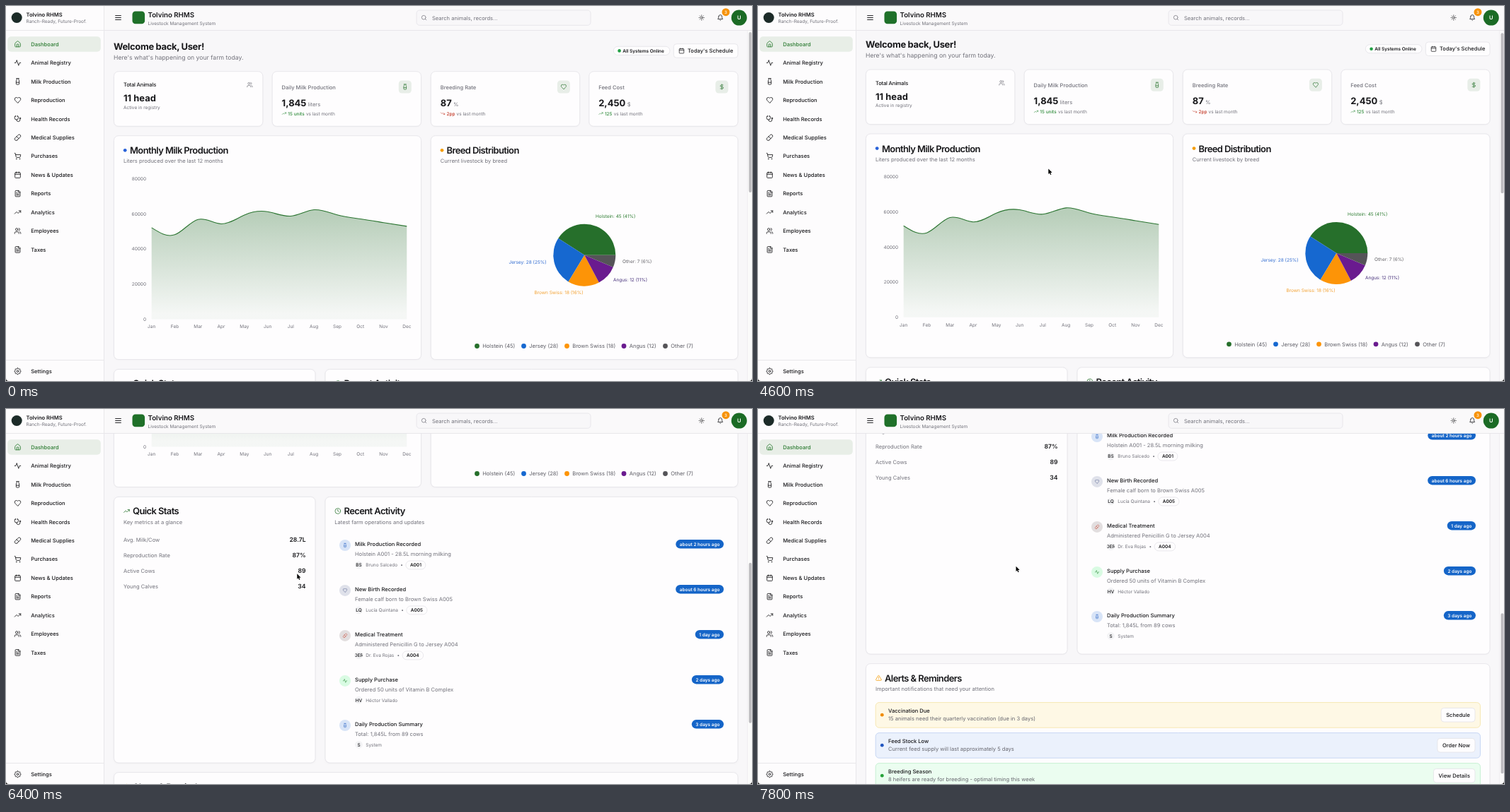
Write an HTML page with a canvas that moves like this. It is 1054 px wide and 531 px high and loops after 8000 ms.

```html
<!DOCTYPE html>
<html lang="en">
<head>
<meta charset="utf-8">
<title>Farm dashboard</title>
<style>
  html, body { margin: 0; width: 100%; height: 100%; overflow: hidden; background: #f8f7f9; }
  canvas { display: block; width: 100vw; height: 100vh; }
</style>
</head>
<body>
<canvas id="stage"></canvas>
<script>
const W = 1054, H = 531, LOOP = 8000, STEP = 200;
const canvas = document.getElementById('stage');
const ctx = canvas.getContext('2d');
const dpr = window.devicePixelRatio || 1;
canvas.width = W * dpr;
canvas.height = H * dpr;

const INK = '#18181b', GREY = '#71717a', GREEN = '#2a7430', BLUE = '#1565c8';
const CARD = '#fefdfe', PAGE = '#f8f7f9', LINE = '#e4e3e7';
const XS = 6.49, SM = 7.57, MD = 8.65, LG = 9.73, XL = 12.97;
const BRAND = 'Tolvino RHMS';

// Icons on a 24 unit grid
const ring = (x, y, r) => `M${x + r} ${y}a${r} ${r} 0 1 1 ${-2 * r} 0a${r} ${r} 0 1 1 ${2 * r} 0`;
const gear = () => {
  let d = '';
  for (let i = 0; i < 96; i++) {
    const a = i / 96 * Math.PI * 2, r = 8.9 + 1.2 * Math.tanh(2 * Math.cos(8 * a));
    d += `${i ? 'L' : 'M'}${12 + r * Math.sin(a)} ${12 - r * Math.cos(a)}`;
  }
  return d + 'Z' + ring(12, 12, 3);
};
const sun = () => {
  let d = ring(12, 12, 4);
  for (let i = 0; i < 8; i++) {
    const c = Math.cos(i * Math.PI / 4), s = Math.sin(i * Math.PI / 4);
    d += `M${12 + 8 * c} ${12 + 8 * s}L${12 + 10 * c} ${12 + 10 * s}`;
  }
  return d;
};
const icons = {
  home: 'M15 21v-8a1 1 0 0 0-1-1h-4a1 1 0 0 0-1 1v8M3 10a2 2 0 0 1 .7-1.5l7-6a2 2 0 0 1 2.6 0l7 6A2 2 0 0 1 21 10v9a2 2 0 0 1-2 2H5a2 2 0 0 1-2-2z',
  pulse: 'M22 12h-4l-3 9L9 3l-3 9H2',
  milk: 'M8 2h8M9 2v2.8c0 .7-.2 1.3-.6 1.8L7 9.4V20a2 2 0 0 0 2 2h6a2 2 0 0 0 2-2V9.4l-1.4-2.8c-.4-.5-.6-1.1-.6-1.8V2M7 15h10',
  heart: 'M19 14c1.5-1.5 3-3.2 3-5.5A5.5 5.5 0 0 0 16.5 3c-1.8 0-3 .5-4.5 2-1.5-1.5-2.7-2-4.5-2A5.5 5.5 0 0 0 2 8.5c0 2.3 1.5 4 3 5.5l7 7z',
  scope: 'M11 2v2M5 2v2M5 3H4a2 2 0 0 0-2 2v4a6 6 0 0 0 12 0V5a2 2 0 0 0-2-2h-1M8 15a6 6 0 0 0 12 0v-3' + ring(20, 10, 2),
  pill: 'm10.5 20.5 10-10a4.9 4.9 0 1 0-7-7l-10 10a4.9 4.9 0 1 0 7 7zM8.5 8.5l7 7',
  cart: 'M2 2h2l2.7 12.4a2 2 0 0 0 2 1.6h9.8a2 2 0 0 0 2-1.6L22 7H5.1' + ring(8, 21, 1) + ring(19, 21, 1),
  calendar: 'M8 2v4M16 2v4M5 4h14a2 2 0 0 1 2 2v14a2 2 0 0 1-2 2H5a2 2 0 0 1-2-2V6a2 2 0 0 1 2-2M3 10h18',
  file: 'M15 2H6a2 2 0 0 0-2 2v16a2 2 0 0 0 2 2h12a2 2 0 0 0 2-2V7zM14 2v6h6M16 13H8M16 17H8M10 9H8',
  up: 'm22 7-8.5 8.5-5-5L2 17M16 7h6v6',
  down: 'm22 17-8.5-8.5-5 5L2 7M16 17h6v-6',
  users: 'M16 21v-2a4 4 0 0 0-4-4H6a4 4 0 0 0-4 4v2M22 21v-2a4 4 0 0 0-3-3.9M16 3.1a4 4 0 0 1 0 7.8' + ring(9, 7, 4),
  dollar: 'M12 2v20M17 5H9.5a3.5 3.5 0 0 0 0 7h5a3.5 3.5 0 0 1 0 7H6',
  bell: 'M6 8a6 6 0 0 1 12 0c0 7 3 9 3 9H3s3-2 3-9M10.3 21a1.9 1.9 0 0 0 3.4 0',
  search: ring(11, 11, 8) + 'M21 21l-4.3-4.3',
  menu: 'M4 6h16M4 12h16M4 18h16',
  clock: ring(12, 12, 10) + 'M12 6v6l4 2',
  alert: 'm21.7 18-8-14a2 2 0 0 0-3.5 0l-8 14A2 2 0 0 0 4 21h16a2 2 0 0 0 1.7-3M12 9v4M12 17h.01',
  gear: gear(),
  sun: sun()
};
for (const k in icons) icons[k] = new Path2D(icons[k]);

// y is the middle of the capitals; returns the width
function text(s, x, y, size, color = INK, weight = 400, align = 'left', spacing = 0, family = 'Inter, sans-serif') {
  ctx.font = `${weight} ${size}px ${family}`;
  ctx.letterSpacing = spacing + 'px';
  ctx.textAlign = align;
  ctx.fillStyle = color;
  ctx.fillText(s, x, y + size * 0.364);
  return ctx.measureText(s).width;
}
function widthOf(s, size, weight) {
  ctx.font = `${weight} ${size}px Inter, sans-serif`;
  ctx.letterSpacing = '0px';
  return ctx.measureText(s).width;
}
function icon(name, x, y, size, color = INK, line = 2) {
  ctx.save();
  ctx.translate(x - size / 2, y - size / 2);
  ctx.scale(size / 24, size / 24);
  ctx.lineWidth = line;
  ctx.lineCap = ctx.lineJoin = 'round';
  ctx.strokeStyle = color;
  ctx.stroke(icons[name]);
  ctx.restore();
}
function box(x, y, w, h, r, fill, stroke, line = 0.8) {
  ctx.beginPath();
  ctx.roundRect(x, y, w, h, r);
  ctx.fillStyle = fill;
  ctx.fill();
  if (stroke) {
    ctx.strokeStyle = stroke;
    ctx.lineWidth = line;
    ctx.stroke();
  }
}
function dot(x, y, r, fill) {
  ctx.beginPath();
  ctx.arc(x, y, r, 0, Math.PI * 2);
  ctx.fillStyle = fill;
  ctx.fill();
}
function rect(x, y, w, h, fill) {
  ctx.fillStyle = fill;
  ctx.fillRect(x, y, w, h);
}
function card(x, y, w, h) {
  ctx.save();
  ctx.shadowColor = 'rgba(0,0,0,.06)';
  ctx.shadowBlur = 2 * dpr;
  ctx.shadowOffsetY = 0.6 * dpr;
  box(x, y, w, h, 6.5, CARD);
  ctx.restore();
  box(x, y, w, h, 6.5, CARD, LINE);
}
const title = (s, x, y) => text(s, x, y, XL, INK, 600, 'left', -0.6);

// Motion: [time, value...] with straight runs between
const scrollKeys = [[4400, 0], [4600, 2.7], [4800, 12], [5000, 30], [5200, 56], [5400, 86], [5600, 200],
  [5800, 316], [6000, 316], [6200, 347], [6400, 390], [6600, 422], [6800, 435], [7000, 435],
  [7200, 455], [7400, 497], [7600, 532], [7800, 544]];
const cursorKeys = [[3000, 625, -14], [3200, 571.5, 40], [3600, 500, 130], [4000, 430, 215], [4400, 410.3, 230.5],
  [4600, 410.3, 230.5], [5400, 411, 232.8], [5800, 411, 232.8], [6800, 411.5, 233.7], [7000, 411.5, 233.7],
  [7400, 385, 228], [7800, 364.5, 222.7]];
function at(keys, t) {
  const i = keys.findIndex(k => k[0] > t);
  if (i === 0) return keys[0].slice(1);
  if (i < 0) return keys[keys.length - 1].slice(1);
  const a = keys[i - 1], b = keys[i], p = (t - a[0]) / (b[0] - a[0]);
  return a.slice(1).map((v, j) => v + (b[j + 1] - v) * p);
}

// Natural cubic spline through evenly spaced points: slopes per point
function slopes(y) {
  const n = y.length, c = [], d = [];
  for (let i = 0; i < n; i++) {
    const mid = i === 0 || i === n - 1 ? 2 : 4;
    const rhs = 3 * (y[Math.min(i + 1, n - 1)] - y[Math.max(i - 1, 0)]);
    const m = mid - (i ? c[i - 1] : 0);
    c[i] = 1 / m;
    d[i] = (rhs - (i ? d[i - 1] : 0)) / m;
  }
  for (let i = n - 2; i >= 0; i--) d[i] -= c[i] * d[i + 1];
  return d;
}
const months = 'Jan Feb Mar Apr May Jun Jul Aug Sep Oct Nov Dec'.split(' ');
const liters = [52100, 48100, 56800, 54300, 59300, 61200, 58700, 62300, 59400, 57100, 55000, 52900];
const X0 = 205.7, DX = 32.78, BASE = 443.5;
const litersY = v => BASE - v / 80000 * 199;
const curveY = liters.map(litersY), curveD = slopes(curveY);

function traceCurve() {
  ctx.beginPath();
  ctx.moveTo(X0, curveY[0]);
  for (let i = 1; i < curveY.length; i++) {
    const x = X0 + DX * i;
    ctx.bezierCurveTo(x - DX * 2 / 3, curveY[i - 1] + curveD[i - 1] / 3, x - DX / 3, curveY[i] - curveD[i] / 3, x, curveY[i]);
  }
}

function drawMilkChart(hover) {
  card(152.5, 183.7, 434, 316.8);
  dot(168.2, 204.3, 2.4, '#2962d9');
  title('Monthly Milk Production', 175, 204.5);
  text('Liters produced over the last 12 months', 166, 219.5, SM, GREY);
  for (let v = 0; v <= 80000; v += 20000) text(String(v), 198, litersY(v), XS, GREY, 400, 'right');
  months.forEach((m, i) => text(m, X0 + DX * i, 454, XS, GREY, 400, 'center'));

  traceCurve();
  ctx.lineTo(X0 + DX * 11, BASE);
  ctx.lineTo(X0, BASE);
  const fade = ctx.createLinearGradient(0, 288, 0, BASE);
  fade.addColorStop(0.05, 'rgba(42,112,48,.33)');
  fade.addColorStop(0.95, 'rgba(42,112,48,.045)');
  ctx.fillStyle = fade;
  ctx.fill();
  traceCurve();
  ctx.strokeStyle = GREEN;
  ctx.lineWidth = 1.1;
  ctx.stroke();

  if (!hover) return;
  dot(X0 + DX * 6, curveY[6], 2.3, GREEN);
  ctx.save();
  ctx.shadowColor = 'rgba(0,0,0,.16)';
  ctx.shadowBlur = 6 * dpr;
  ctx.shadowOffsetY = 2 * dpr;
  box(412, 298.3, 70, 14.2, 4, CARD);
  ctx.restore();
  box(412, 298.3, 70, 14.2, 4, CARD, LINE, 0.6);
  box(418, 302.7, 5.4, 5.4, 1, GREEN);
  text('Liters', 428, 305.4, XS, GREY);
  text('58,700', 476, 305.4, XS, INK, 500, 'right', 0, '"DejaVu Sans Mono", monospace');
}

// name, head count, share, colour, label colour, label x, label y, align, legend x
const breeds = [
  ['Holstein', 45, 41, '#266f2b', '#2e7d32', 833, 297.5, 'left', 665.5],
  ['Jersey', 28, 25, '#1668d0', '#2f6bd0', 763.5, 362.6, 'right', 731.5],
  ['Brown Swiss', 18, 16, '#fd9407', '#f2a02e', 815.5, 405.2, 'right', 792.5],
  ['Angus', 12, 11, '#6a1b8f', '#46307a', 858, 387.4, 'left', 873],
  ['Other', 7, 6, '#555458', '#66656a', 871, 361.2, 'left', 931.5]
];
function drawBreeds() {
  card(600.3, 183.7, 433.7, 316.8);
  dot(616, 204.3, 2.4, '#f59e0b');
  title('Breed Distribution', 622.5, 204.5);
  text('Current livestock by breed', 613.7, 219.5, SM, GREY);
  let from = 0;
  for (const [name, n, share, fill, ink, x, y, align, lx] of breeds) {
    const to = from + n / 110 * Math.PI * 2;
    ctx.beginPath();
    ctx.moveTo(817.3, 352.7);
    ctx.arc(817.3, 352.7, 44, -from, -to, true);
    ctx.closePath();
    ctx.fillStyle = fill;
    ctx.fill();
    from = to;
    text(`${name}: ${n} (${share}%)`, x, y, XS, ink, 400, align);
    dot(lx, 481.5, 3.4, fill);
    text(`${name} (${n})`, lx + 7.7, 481.5, SM, '#5b5b63');
  }
}

function drawMetric(x, label, value, unit, trend, delta, glyph) {
  card(x, 92.7, 210.3, 77.6);
  const left = x + 13.4, color = trend === 'up' ? '#2e8b3a' : '#c0321f';
  text(label, left, 114.8, SM, GREY, 500);
  const w = text(value, left, 137.2, XL, INK, 700);
  text(unit, left + w + 2.4, 139, SM, GREY);
  icon(trend, left + 3.3, 152.2, XS, color);
  const dw = text(delta, left + 8.7, 152.2, XS, color, 500);
  text('vs last month', left + 8.7 + dw + 2.2, 152.2, XS, GREY);
  box(x + 178.6, 105.5, 18, 18, 4.5, '#e8eee8');
  icon(glyph, x + 187.6, 114.5, MD, GREEN);
}

function drawTop() {
  text('Welcome back, User!', 152, 57.3, XL, INK, 700, 'left', -0.34);
  text("Here's what's happening on your farm today.", 152, 72.4, MD, GREY);
  box(858.3, 57.3, 79.7, 12.2, 6.1, CARD, LINE);
  dot(866.6, 63.4, 2.3, '#22a045');
  text('All Systems Online', 871.3, 63.4, XS, INK, 600);
  box(943.3, 53.7, 90.7, 19.5, 4, CARD, LINE);
  icon('calendar', 954.5, 63.4, MD);
  text("Today's Schedule", 963, 63.4, SM, INK, 500);

  card(152.5, 92.7, 210.3, 77.6);
  text('Total Animals', 166, 111.5, SM, INK, 500, 'left', -0.19);
  icon('users', 344.4, 111.5, MD, GREY);
  text('11 head', 166, 130.6, XL, INK, 700);
  text('Active in registry', 166, 143.2, XS, GREY);
  drawMetric(376.2, 'Daily Milk Production', '1,845', 'liters', 'up', '15 units', 'milk');
  drawMetric(600.3, 'Breeding Rate', '87', '%', 'down', '2pp', 'heart');
  drawMetric(823.8, 'Feed Cost', '2,450', '$', 'up', '125', 'dollar');
}

const stats = [['Avg. Milk/Cow', '28.7L'], ['Reproduction Rate', '87%'], ['Active Cows', '89'], ['Young Calves', '34']];
function drawStats() {
  card(152.5, 514.4, 284.5, 376.6);
  icon('up', 170.4, 534.5, 9.4, GREEN);
  title('Quick Stats', 179, 534.7);
  text('Key metrics at a glance', 166, 549.8, SM, GREY);
  stats.forEach(([label, value], i) => {
    text(label, 166, 575.3 + 22 * i, SM, GREY);
    text(value, 423.6, 575.3 + 22 * i, MD, INK, 600, 'right');
  });
}

const events = [
  { y: 581.3, name: 'Milk Production Recorded', note: 'Holstein A001 - 28.5L morning milking', who: 'Bruno Salcedo', mark: 'BS', tag: 'A001', ago: 'about 2 hours ago', glyph: 'milk', bg: '#d8e4f7', ink: '#2a66c4' },
  { y: 645.2, name: 'New Birth Recorded', note: 'Female calf born to Brown Swiss A005', who: 'Lucía Quintana', mark: 'LQ', tag: 'A005', ago: 'about 6 hours ago', glyph: 'heart', bg: '#dfe1ea', ink: '#54628f' },
  { y: 709.2, name: 'Medical Treatment', note: 'Administered Penicillin G to Jersey A004', who: 'Dr. Eva Rojas', mark: 'DER', tag: 'A004', ago: '1 day ago', glyph: 'pill', bg: '#e2dedf', ink: '#c9432f' },
  { y: 773.2, name: 'Supply Purchase', note: 'Ordered 50 units of Vitamin B Complex', who: 'Héctor Vallado', mark: 'HV', ago: '2 days ago', glyph: 'pulse', bg: '#d9fbe3', ink: '#2e8b3a' },
  { y: 836.3, name: 'Daily Production Summary', note: 'Total: 1,845L from 89 cows', who: 'System', mark: 'S', ago: '3 days ago', glyph: 'milk', bg: '#d8e4f7', ink: '#2a66c4' }
];
function drawEvent({ y, name, note, who, mark, tag, ago, glyph, bg, ink }) {
  dot(479, y + 1.7, 8, bg);
  icon(glyph, 479, y + 1.7, XS, ink);
  text(name, 493, y, SM, INK, 500);
  text(note, 493, y + 13.9, SM, GREY);
  const my = y + (tag ? 29.7 : 29);
  ctx.save();
  dot(498.5, my, 5.4, '#f3f3f5');
  ctx.clip();
  text(mark, 498.5, my, XS, INK, 500, 'center');
  ctx.restore();
  const end = 508.3 + text(who, 508.3, my, XS, GREY);
  if (tag) {
    text('•', end + 6, my, XS, GREY, 400, 'center');
    const w = widthOf(tag, XS, 600) + 12;
    box(end + 11.8, my - 6, w, 12, 6, CARD, LINE);
    text(tag, end + 11.8 + w / 2, my, XS, INK, 600, 'center');
  }
  const bw = widthOf(ago, XS, 600) + 11;
  box(1014 - bw, y - 6.2, bw, 12.4, 6.2, BLUE);
  text(ago, 1014 - bw / 2, y, XS, '#fff', 600, 'center');
}
function drawActivity() {
  card(451, 514.4, 583, 376.6);
  icon('clock', 468.8, 534.5, 9.2, GREEN);
  title('Recent Activity', 477.5, 534.7);
  text('Latest farm operations and updates', 464.3, 549.8, SM, GREY);
  events.forEach(drawEvent);
}

const alerts = [
  ['Vaccination Due', '15 animals need their quarterly vaccination (due in 3 days)', 'Schedule', '#fef8e5', '#f4e3a4', '#f08c00'],
  ['Feed Stock Low', 'Current feed supply will last approximately 5 days', 'Order Now', '#ebf1fc', '#bccff2', '#2256c0'],
  ['Breeding Season', '8 heifers are ready for breeding - optimal timing this week', 'View Details', '#ebfdf0', '#bdeccb', '#27a33a']
];
function drawAlerts() {
  card(152.5, 904.6, 881.5, 190);
  icon('alert', 170.4, 924.8, 9.4, '#f59e0b');
  title('Alerts & Reminders', 179, 925.2);
  text('Important notifications that need your attention', 166, 940.1, SM, GREY);
  alerts.forEach(([name, note, action, bg, edge, ink], i) => {
    const y = 959.6 + 43 * i;
    box(166.2, y, 854.3, 35.6, 5, bg, edge);
    dot(175.3, y + 17.6, 2.4, ink);
    text(name, 184, y + 11.9, SM, INK, 500);
    text(note, 184, y + 23, SM, '#66666e');
    const w = widthOf(action, SM, 500) + 14;
    box(1013 - w, y + 7.8, w, 19.6, 4, CARD, LINE);
    text(action, 1013 - w / 2, y + 17.6, SM, INK, 500, 'center');
  });
}

const nav = [['home', 'Dashboard'], ['pulse', 'Animal Registry'], ['milk', 'Milk Production'], ['heart', 'Reproduction'],
  ['scope', 'Health Records'], ['pill', 'Medical Supplies'], ['cart', 'Purchases'], ['calendar', 'News & Updates'],
  ['file', 'Reports'], ['up', 'Analytics'], ['users', 'Employees'], ['file', 'Taxes']];
function drawSidebar() {
  rect(0, 0, 138, H, '#fdfcfd');
  rect(138, 0, 0.8, H, LINE);
  rect(0, 34.2, 138, 0.8, LINE);
  dot(15.2, 16.5, 7.5, '#1c2b28');
  text(BRAND, 28.5, 12.2, SM, INK, 600);
  text('Ranch-Ready, Future-Proof.', 28.5, 21.8, XS, GREY);
  box(2.2, 43.2, 131.6, 21.6, 5, '#e8eee7');
  nav.forEach(([glyph, label], i) => {
    const y = 54 + 26.45 * i, color = i ? INK : '#2a7a30';
    icon(glyph, 16.5, y, 10.2, color);
    text(label, 35.2, y, SM, color, 500);
  });
  rect(0, 501.2, 138, 0.8, LINE);
  icon('gear', 16.5, 517.2, 10.8);
  text('Settings', 35.2, 517.2, SM, INK, 500);
}

function drawHeader() {
  rect(138.8, 0, W, 34.6, '#faf9fa');
  rect(138.8, 34.2, W, 0.8, LINE);
  icon('menu', 158.5, 16.5, 11.6);
  box(178.5, 7.6, 17.6, 17.6, 4.3, '#1f7029');
  text(BRAND, 200.5, 12.3, LG, INK, 600);
  text('Livestock Management System', 200.5, 24.2, XS, GREY);
  box(580, 6, 246, 21.3, 4.3, '#f8f7f9', LINE);
  icon('search', 590.6, 16.6, MD, GREY);
  text('Search animals, records...', 602, 17, SM, GREY);
  icon('sun', 982.8, 16.5, MD);
  icon('bell', 1009.2, 16.5, 9.4);
  dot(1017, 8.7, 5.5, '#f7930a');
  text('3', 1017, 8.7, 6, '#fff', 500, 'center');
  dot(1035.8, 16.6, 11, '#1b6b25');
  text('U', 1035.8, 16.6, SM, '#fff', 600, 'center');
}

function drawScrollbar(scroll) {
  rect(1047.6, 35, 7, H, '#fafafa');
  rect(1047.4, 35, 0.6, H, '#e9e8eb');
  box(1049.6, 37 + scroll * 0.4635, 3.9, 227, 2, '#bdbcbf');
}

function drawCursor(x, y) {
  ctx.beginPath();
  [[0, 0], [0, 7.4], [1.7, 5.9], [2.8, 8.6], [4.1, 8], [2.9, 5.4], [5.2, 5.3]]
    .forEach(([dx, dy]) => ctx.lineTo(x + dx, y + dy));
  ctx.closePath();
  ctx.lineJoin = 'round';
  ctx.strokeStyle = '#fff';
  ctx.lineWidth = 1.5;
  ctx.stroke();
  ctx.fillStyle = '#000';
  ctx.fill();
}

function drawCorners() {
  const r = 4;
  ctx.fillStyle = '#111';
  for (const [x, dir] of [[0, 1], [W, -1]]) {
    ctx.beginPath();
    ctx.moveTo(x, H - r);
    ctx.quadraticCurveTo(x, H, x + r * dir, H);
    ctx.lineTo(x, H);
    ctx.fill();
  }
}

function draw(t) {
  const [scroll] = at(scrollKeys, t), [cx, cy] = at(cursorKeys, t);
  const pointerY = cy + scroll;
  const hover = t >= 4600 && pointerY > 245 && pointerY < BASE;
  ctx.setTransform(dpr, 0, 0, dpr, 0, 0);
  ctx.textRendering = 'geometricPrecision';
  rect(0, 0, W, H, PAGE);
  ctx.save();
  ctx.translate(0, -scroll);
  drawTop();
  drawMilkChart(hover);
  drawBreeds();
  drawStats();
  drawActivity();
  drawAlerts();
  ctx.restore();
  drawHeader();
  drawSidebar();
  drawScrollbar(scroll);
  if (t > 3000) drawCursor(cx, cy);
  drawCorners();
}

const start = performance.now();
function tick() {
  const t = (performance.now() - start) % LOOP;
  draw(Math.floor(t / STEP) * STEP);
  requestAnimationFrame(tick);
}
tick();
</script>
</body>
</html>
```
